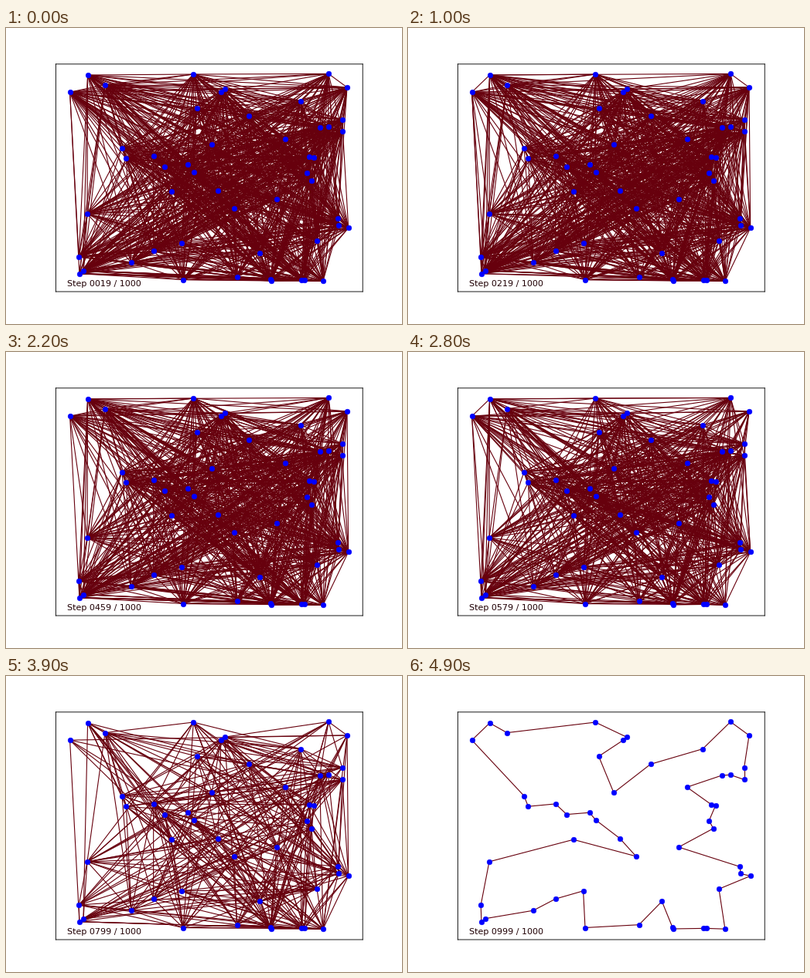
A matplotlib script that plays this animation: 512x384 px, repeating every 6000 ms.

```python
import numpy as np
import matplotlib.pyplot as plt
from matplotlib.animation import FuncAnimation
from matplotlib.collections import LineCollection

WIDTH, HEIGHT, DPI = 512, 384, 80
LEFT, RIGHT, TOP, BOTTOM = 64.4, 461.2, 46.8, 342
FRAMES, LAST = 60, 49          # the finished tour is held from LAST on
STEPS_PER_FRAME = 20

# Cities in the order of the best tour, in pixels from the top left.
CITIES = np.array([
    (82.6, 83.2), (105.6, 61), (128, 73.6), (242.3, 60), (282.6, 79.2),
    (278, 83.4), (246.6, 104.2), (266, 151.4), (313.6, 114.4), (381, 94.6),
    (417, 59.4), (441, 77), (434.6, 118.8), (434.6, 134.4), (416.6, 128.2),
    (405.6, 129), (360.6, 144.2), (392.2, 166.8), (397.8, 167.6), (389.3, 187.6),
    (394.7, 197.8), (350, 222), (429.2, 247.4), (430, 256.4), (442.7, 259.4),
    (402, 276.3), (409.9, 328.2), (386, 327.4), (381.7, 327.4), (342.7, 328),
    (341.9, 326), (328.3, 292.4), (298.7, 322.7), (229, 326.5), (226.6, 278.8),
    (190.6, 289.2), (162, 304.2), (100, 314.7), (94.9, 318.7), (94.2, 297),
    (105, 240.9), (213.9, 212.2), (294.8, 233.9), (273.9, 210.7), (242.6, 186.7),
    (234.7, 177.2), (205.2, 179.6), (190.7, 165.9), (155.4, 169.2), (150, 155.5)])
N = len(CITIES)

a, b = np.triu_indices(N, 1)
segments = np.stack([CITIES[a], CITIES[b]], axis=1)
length = np.hypot(*(CITIES[a] - CITIES[b]).T)
in_tour = (b - a == 1) | (b - a == N - 1)


def noise(seed):
    return np.random.default_rng(seed).normal(size=len(a))


base_noise = noise(7)


def edges_at(k):
    """Edges tried in one frame: cooling leaves fewer, then only the tour."""
    u = k / LAST
    count = round(N + 900 * (1 - u**3) ** 1.5)
    keep = 0.8 * u
    score = keep * base_noise + np.sqrt(1 - keep**2) * noise(100 + k)
    score += 20 * u**24 * in_tour - u**4 * length / 300
    return segments[np.argsort(-score)[:count]]


fig = plt.figure(figsize=(WIDTH / DPI, HEIGHT / DPI), dpi=DPI, facecolor="white")
ax = fig.add_axes([LEFT / WIDTH, 1 - BOTTOM / HEIGHT,
                   (RIGHT - LEFT) / WIDTH, (BOTTOM - TOP) / HEIGHT])
ax.set(xlim=(LEFT, RIGHT), ylim=(BOTTOM, TOP), xticks=[], yticks=[])
for spine in ax.spines.values():
    spine.set_snap(False)

lines = LineCollection([], colors="#67000d", linewidths=1.0, zorder=2)
ax.add_collection(lines, autolim=False)
ax.plot(*CITIES.T, "o", color="#0000ff", markersize=6, markeredgewidth=0.5,
        zorder=3)
label = ax.text(78.6, 335.3, "", fontfamily="DejaVu Sans", fontsize=10,
                color="#200004", zorder=4)


def update(frame):
    k = min(frame, LAST)
    lines.set_segments(edges_at(k))
    label.set_text(f"Step {(k + 1) * STEPS_PER_FRAME - 1:04d} / 1000")
    return lines, label


anim = FuncAnimation(fig, update, frames=FRAMES, interval=100, repeat=True,
                     repeat_delay=0)
plt.show()
```
